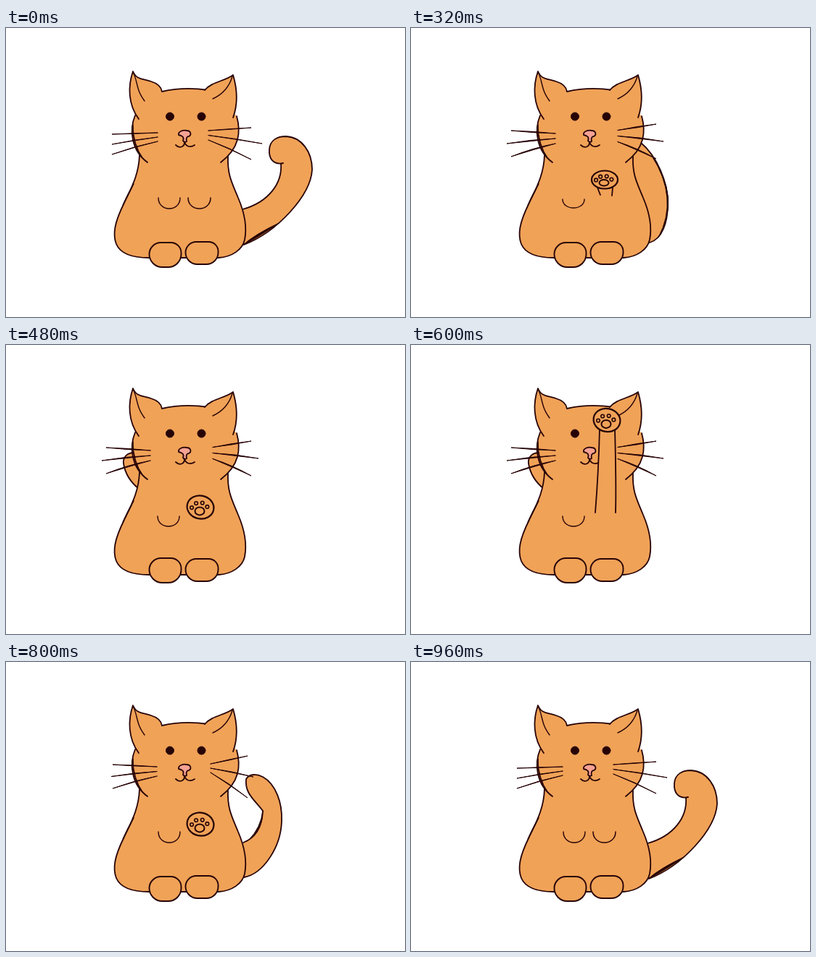
An HTML page with a canvas for the animation above (1000 ms loop, 550 px wide and 400 px high).

```html
<!DOCTYPE html>
<html lang="en">
<head>
<meta charset="utf-8">
<title>Waving cat</title>
<style>
html, body { margin: 0; width: 100%; height: 100%; overflow: hidden; background: #fff; }
canvas { display: block; }
</style>
</head>
<body>
<canvas id="stage" width="550" height="400"></canvas>
<script>
const ctx = document.getElementById('stage').getContext('2d');
const FUR = '#f0a257', INK = '#270306', PINK = '#f5a294';
const LOOP = 1000, BEAT = 160;

ctx.lineCap = ctx.lineJoin = 'round';

function line(d, w = 1.8) {
  ctx.strokeStyle = INK;
  ctx.lineWidth = w;
  ctx.stroke(new Path2D(d));
}

// Fills the pieces as one area but inks each piece separately
function shape(pieces, w, color = FUR) {
  ctx.fillStyle = color;
  ctx.fill(new Path2D('M' + pieces.join('L')));
  line('M' + pieces.join('M'), w);
}

// Curved stroke, thickest in the middle
function brush(x0, y0, cx, cy, x1, y1, w) {
  const len = Math.hypot(x1 - x0, y1 - y0);
  const nx = (y0 - y1) / len * w, ny = (x1 - x0) / len * w;
  shape([`${x0} ${y0}Q${cx + nx} ${cy + ny} ${x1} ${y1}Q${cx - nx} ${cy - ny} ${x0} ${y0}`], 1, INK);
}

function oval(x, y, rx, ry, w, turn = 0, color = FUR) {
  ctx.beginPath();
  ctx.ellipse(x, y, rx, ry, turn, 0, 7);
  ctx.fillStyle = color;
  ctx.fill();
  ctx.strokeStyle = INK;
  ctx.lineWidth = w;
  ctx.stroke();
}

const tails = {
  out() {
    shape(['382 187C368 190 362 180 363 168C364 155 374 150 386 150C408 151 422 172 422 196C420 232 374 282 328 300',
      '326 251C362 241 381 215 379 188']);
    brush(327, 300, 345, 288, 376, 270, 3);
  },
  near() {
    shape(['331 162C336 154 346 155 354 159C372 169 381 195 380 220C379 256 355 293 328 298',
      '327 250C345 243 353 227 354 206C342 190 329 182 331 162']);
    brush(354, 206, 353, 230, 335, 246, 2);
  },
  behind() {
    shape(['316 158C340 178 354 214 354 243C354 270 346 292 329 297', '300 260V175']);
    brush(332, 177, 371, 236, 341, 290, 1.5);
  },
  left() {
    shape(['177 149C166 149 161 156 162 164C164 177 172 190 183 199', '210 170']);
  }
};

// Three whiskers spread between a root column and a tip column
function fan(rootX, rootY, rootGap, tipX, tipY, tipGap, bulge, w) {
  for (let i = 0; i < 3; i++) {
    const x0 = rootX, y0 = rootY + i * rootGap;
    const x1 = tipX + (i === 1 ? bulge : 0), y1 = tipY + i * tipGap;
    brush(x0, y0, (x0 + x1) / 2, (y0 + y1) / 2 - i, x1, y1, w);
  }
}

const whiskers = {
  rest() { fan(209, 145, 6, 146, 147, 14, 0, .7); fan(279, 142, 6.5, 338, 138, 22, 15, .7); },
  lift() { fan(208, 145, 6.5, 147, 142, 16.5, -2, .9); fan(282, 141, 6, 333, 130, 29, 8, .9); },
  wide() { fan(199, 146, 7, 138, 142, 18, -6, 1.3); fan(285, 141.5, 8, 338, 133, 24, 10, 1.3); }
};

// Folded arm
function cup(x, y, w, h, ink) {
  line(`M${x} ${y}c0 ${h * 1.33} ${w} ${h * 1.33} ${w} 0`, ink);
}

function paw(x, y, rx, ry, turn) {
  const padX = x - 1, padY = y + ry * .34;
  oval(x, y, rx, ry, 2.2, turn);
  oval(padX, padY, 6.5, ry * .34, 2);
  for (let i = 0; i < 4; i++) {
    const a = (204 + 42 * i) * Math.PI / 180;
    oval(padX + 12 * Math.cos(a), padY + ry * .75 * Math.sin(a), 2.3, 2.3, 1.6);
  }
}

const arms = {
  rest() { cup(251, 235, 31, 15, 1.5); },
  start() { brush(252, 221, 266, 225, 281, 223, 1.8); },
  rise() {
    line('M257 221L261 231M278 221L277 232');
    paw(267, 210, 18, 12.5, 0);
  },
  high() {
    shape(['254 232C257 195 259 155 260 116', '281 116C282 155 283 195 282 232']);
    paw(270, 104, 18.5, 16, .2);
  },
  front() { paw(268, 224.5, 18.5, 16, .2); },
  down() { cup(254, 240, 30, 13, 2.6); }
};

function body() {
  shape(['184 176C183 205 171 224 163 242C149 270 147 286 152 299C158 313 176 318 197 318H293C311 317 326 307 329 293C333 272 326 249 320 235C312 215 305 204 306 178']);
  shape(['195 186C172 169 170 140 178 121', '215 88Q245 81 279 86', '318 122C324 144 322 166 296 186']);
  brush(175, 134, 174, 161, 189, 181, 1);
  brush(176, 216, 170, 227, 161, 245, 1);

  shape(['183 126C168 106 168 80 175 60C180 72 189 70 200 74C210 77 214 82 215 88']);
  shape(['274 86C284 74 301 74 313 65C318 82 321 102 313 124']);
  line('M175 61C180 70 180 80 184 89Q186 94 191 101M312 67C307 84 296 93 285 98', 1.4);
}

function face(shut) {
  for (const x of [226, 269.5]) {
    if (shut) brush(x - 6, 122, x, 123, x + 6, 123, 1);
    else oval(x, 122.5, 5.5, 5.5, 1, 0, INK);
  }
  shape(['238 148C237 143 244 141 249 142C255 142 256 148 252 150C249 150 248 153 249 157Q246 159 244 156C246 151 243 149 238 148'], 1.8, PINK);
  line('M234 162C239 167 246 165 246 158C248 164 254 166 260 162');
}

function foot(x, y, w, h) {
  ctx.beginPath();
  ctx.roundRect(x, y, w, h, [18, 16, 20, 20]);
  ctx.fillStyle = FUR;
  ctx.fill();
  ctx.strokeStyle = INK;
  ctx.lineWidth = 1.9;
  ctx.stroke();
}

const tailBeats = ['out', 'near', 'behind', 'left', 'behind', 'near', 'out'];
const whiskerBeats = ['rest', 'lift', 'wide', 'wide', 'lift', 'lift', 'rest'];

function armPose(t) {
  if (t < 160 || t >= 960) return 'rest';
  if (t < 320) return 'start';
  if (t >= 840) return 'down';
  if (t >= 720) return 'front';
  const wave = (t - 320) % 200;
  if (wave < 40) return 'rise';
  return wave < 160 || t > 520 ? 'high' : 'front';
}

function draw(t) {
  const beat = Math.floor(t / BEAT);
  const hop = beat === 3 ? 2 : 0;
  const reach = beat === 2 || beat === 3;
  ctx.fillStyle = '#fff';
  ctx.fillRect(0, 0, 550, 400);
  tails[tailBeats[beat]]();
  body();
  foot(197.5, 297 - hop, 44, 34);
  foot(247.5, 296, 45, 31);
  cup(reach ? 209 : 210, reach ? 237 : 235, 30, reach ? 12 + hop : 15, beat === 4 ? 1.9 : 1.4);
  face(t >= 840 && t < 960);
  whiskers[whiskerBeats[beat]]();
  arms[armPose(t)]();
}

const start = performance.now();
function tick() {
  draw((performance.now() - start) % LOOP);
  requestAnimationFrame(tick);
}
tick();
</script>
</body>
</html>
```
